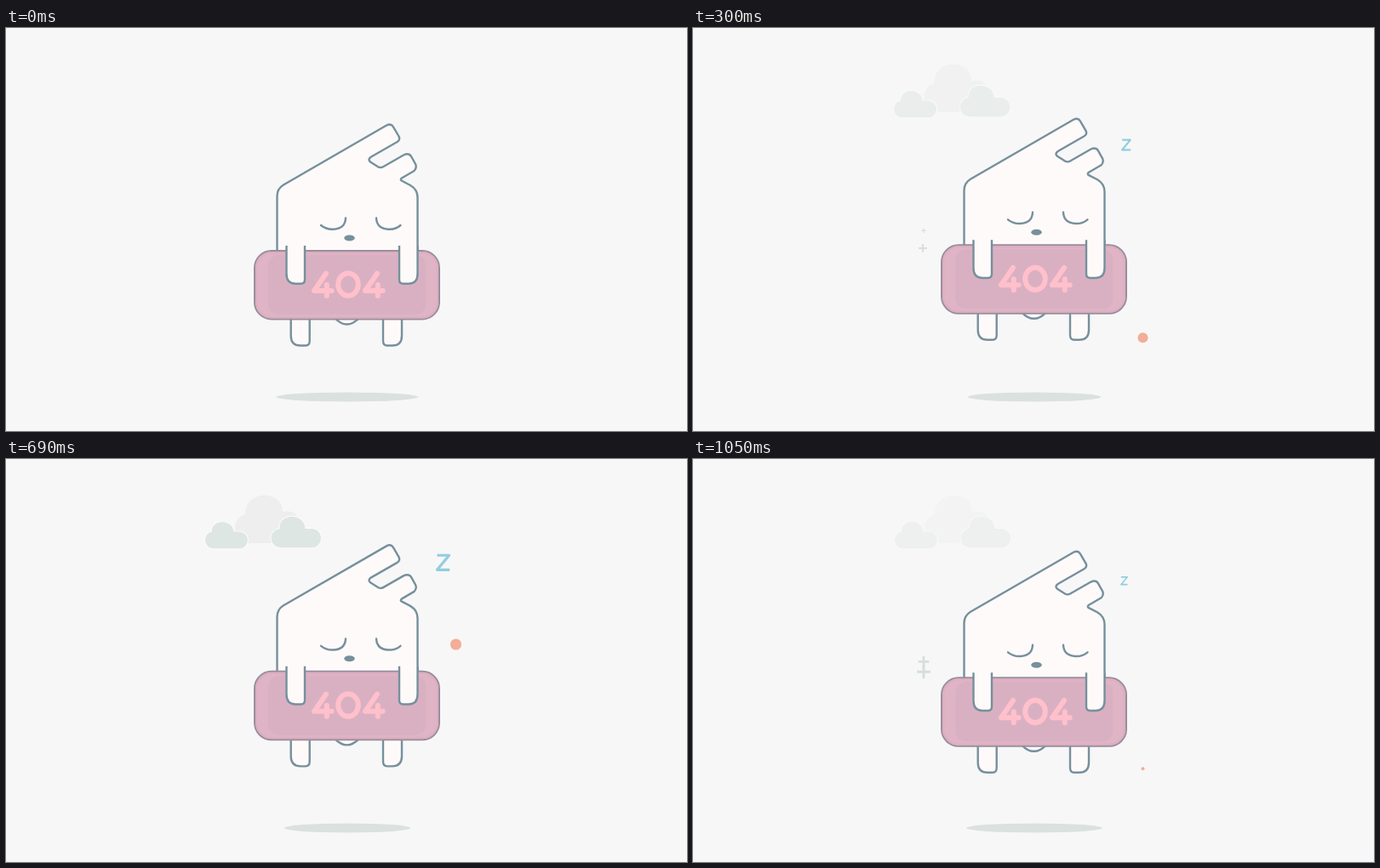
An HTML page that plays this animation: 800x474 px, repeating every 1.08 s.

```html
<!DOCTYPE html>
<html lang="en">
<head>
<meta charset="utf-8">
<title>404</title>
<style>
html, body { margin: 0; width: 100%; height: 100%; overflow: hidden; background: #f7f7f7; }
svg { display: block; width: 100%; height: 100%; }
.skin { fill: #fefaf9; stroke: #76909c; stroke-width: 2.4; stroke-linejoin: round; }
.line { fill: none; stroke: #76909c; stroke-width: 2.4; stroke-linecap: round; }
.small { fill: #dee6e4; stroke: #fbfbfb; stroke-width: 2; paint-order: stroke; }
.digits { fill: none; stroke: #ffc0cb; stroke-width: 6; stroke-linecap: round; stroke-linejoin: round; }
.dot { fill: #f3ad98; }
.plus { fill: none; stroke: #d7dfdc; }
</style>
</head>
<body>
<svg viewBox="0 0 800 474">
  <g id="clouds">
    <path fill="#eee" d="M286 99C264 99 264 70 281 65C281 36 325 36 325 62C335 60 342 64 342 68L313 99Z"/>
    <path class="small" d="M244.5 105.3A10 10 0 0 1 242 85.5C241 70 267 70 267.5 85.5H274A9.9 9.9 0 0 1 274 105.3Z"/>
    <path class="small" d="M324 104.2A11 11 0 0 1 321.5 82C320 63 351 63 351.5 82H359A11.1 11.1 0 0 1 359 104.2Z"/>
  </g>
  <ellipse id="shadow" cx="401" cy="434" ry="5.5" fill="#dbe1df"/>
  <g id="hero">
    <path id="leg" class="skin" d="M334.7 340V362Q334.7 373.5 346 373.5H352Q356.7 373.5 356.7 368V340"/>
    <use href="#leg" transform="matrix(-1 0 0 1 799.7 0)"/>
    <path class="skin" d="M386 341Q400.5 356 415 341"/>
    <path class="skin" d="M318.5 264V198Q318.5 189 326 184.5L447 114.5Q452 111.8 455 116.3L461.5 127.5Q463.5 131.5 459.5 134L429 151.5Q424.5 154.5 428 157.5L437 163.2Q440 165 443.5 163L467 149.5Q473 146.5 476 151L481 160Q483 164.5 479.5 168L465 176.5Q462.5 178.5 465 179.8L475 185Q483.5 190 483.5 199.5V264"/>
    <path class="line" d="M370 232Q376 237 384.5 236.7Q398.5 236 399 223.5M435 223.5Q435.5 236 449.5 236.7Q458 237 463.5 232"/>
    <ellipse cx="403.5" cy="247" rx="6.3" ry="3.5" fill="#76909c"/>
    <rect x="292" y="262" width="217" height="80.5" rx="20" fill="#dfb4c5" stroke="#988e9e" stroke-width="2"/>
    <rect x="294" y="264" width="213" height="76.5" rx="18" fill="none" stroke="#ddadbf" stroke-width="2"/>
    <rect x="308" y="267" width="185.5" height="70" rx="13" fill="#d9b0c2"/>
    <g class="digits" role="img" aria-label="404">
      <path id="four" d="M376 288.7L362 309H382.7M376.8 302V315"/>
      <ellipse cx="402" cy="301.7" rx="11.8" ry="13.2"/>
      <use href="#four" x="60"/>
    </g>
    <path id="arm" class="skin" d="M329.5 256V289Q329.5 300.7 340 300.7H346.5Q351 300.7 351 296V256"/>
    <use href="#arm" transform="matrix(-1 0 0 1 813 0)"/>
  </g>
  <path id="snore" fill="none" stroke="#92cddf" stroke-width="3.2" stroke-linejoin="round" d="M-7-8.5H7L-7 8.5H7.6"/>
  <g id="pops"></g>
</svg>
<script>
const LOOP = 1080, STEP = 30, TOP = 20;
const byId = id => document.getElementById(id);
const clouds = byId('clouds'), shadow = byId('shadow'), hero = byId('hero');
const snore = byId('snore'), pops = byId('pops');

// Rise to the top, rest for one step, then sink a little more slowly.
function phaseAt(ms) {
  const step = Math.floor((ms % LOOP) / STEP);
  return step <= TOP ? step : TOP - (step - TOP - 1) * 13 / 14;
}

// A particle swells and shrinks between two phases.
function makeParticle(kind, x, y, from, to, peak) {
  const node = document.createElementNS('http://www.w3.org/2000/svg', kind === 'dot' ? 'circle' : 'path');
  node.setAttribute('class', kind);
  node.setAttribute('transform', `translate(${x} ${y})`);
  pops.append(node);
  return phase => {
    const alive = phase > from && phase < to;
    const r = alive ? peak * Math.sin(Math.PI * (phase - from) / (to - from)) : 0;
    node.setAttribute('visibility', alive ? 'visible' : 'hidden');
    if (kind === 'dot') {
      node.setAttribute('r', r);
    } else {
      node.setAttribute('d', `M${-r} 0H${r}M0 ${-r}V${r}`);
      node.setAttribute('stroke-width', Math.min(3, r * .45));
    }
  };
}

const particles = [
  makeParticle('dot', 271, 250.5, 3, 7, 5.4),
  makeParticle('dot', 528.5, 364.3, 6, 16, 6.3),
  makeParticle('dot', 528.5, 218, 13, 24, 6.6),
  makeParticle('plus', 271, 238.3, 5, 10.7, 7),
  makeParticle('plus', 271, 250.3, 5, 9, 8),
  makeParticle('plus', 270, 259, 8, 13, 5)
];

function draw(ms) {
  const phase = phaseAt(ms);
  clouds.setAttribute('transform', `translate(${(18 - phase) * .27} 0)`);
  clouds.setAttribute('opacity', Math.min(1, phase / 18));
  shadow.setAttribute('rx', 83.5 - .52 * phase);
  hero.setAttribute('transform', `translate(0 ${-.67 * phase})`);

  const size = Math.sqrt(Math.max(0, phase - 3) / 15);
  snore.setAttribute('visibility', size > 0 ? 'visible' : 'hidden');
  snore.setAttribute('transform', `translate(${499 + 14.5 * size} ${156.8 - 1.93 * phase}) scale(${size})`);
  particles.forEach(update => update(phase));
}

let start;
function tick(now) {
  start ??= now;
  draw(now - start);
  requestAnimationFrame(tick);
}
draw(0);
requestAnimationFrame(tick);
</script>
</body>
</html>
```
